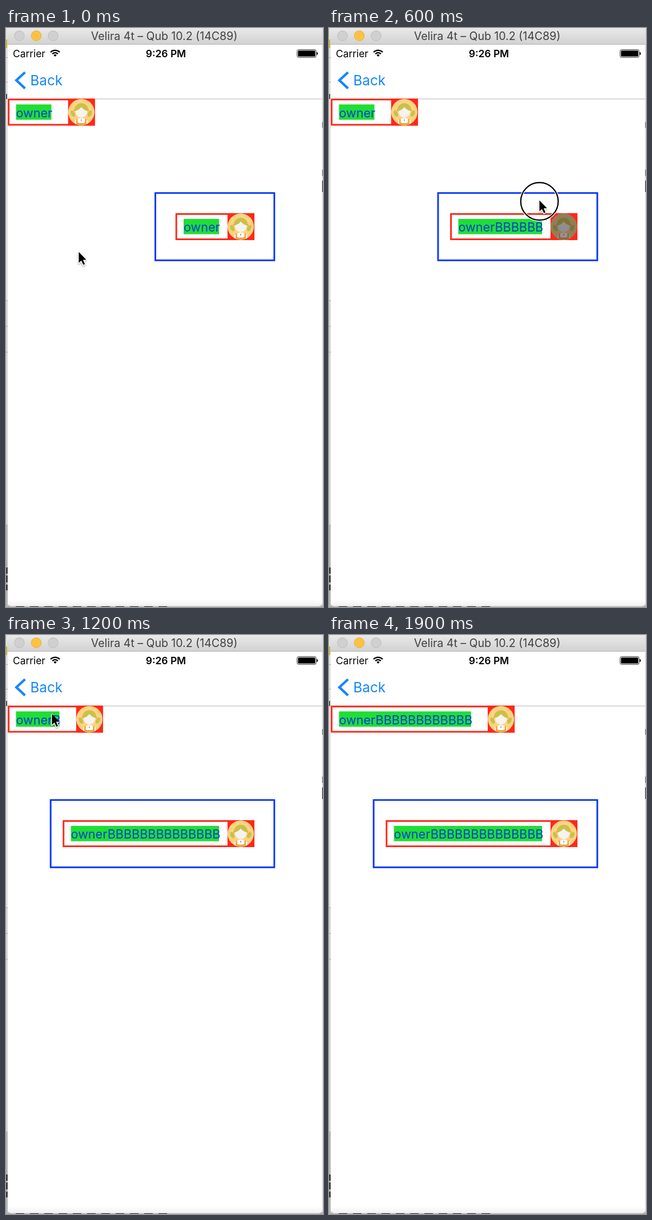
An HTML page with a canvas that plays this animation: 555 by 1010 pixels, repeating every 2000 ms.

```html
<!DOCTYPE html>
<html lang="en">
<head>
<meta charset="utf-8">
<title>Growing labels</title>
<style>
  html, body { margin: 0; width: 100%; height: 100%; overflow: hidden; background: #fff; }
  canvas { display: block; width: 555px; height: 1010px; }
</style>
</head>
<body>
<canvas id="stage" width="555" height="1010"></canvas>
<script>
const ctx = document.getElementById('stage').getContext('2d');
const LOOP = 2000, STEP = 100;
const RED = '#ff2819', GREEN = '#1fdf34', BLUE = '#0636fb', SKY = '#1586fa';
const NAME = 'owner', NAME_W = 62, LETTER_W = 14.1;

// Letters appended to each label, one entry per step
const rightCount = [0, 0, 0, 0, 2, 4, 6, 9, 11, 13, 14];
const leftCount = [0, 0, 0, 0, 0, 0, 0, 0, 0, 0, 0, 0, 1, 3, 5, 7, 9, 10, 11, 12];

// Pointer stops: step, x, y
const stops = [[0, 127, 390], [3, 368, 300], [10, 368, 300], [12, 80, 137], [18, 80, 137]];
const PRESS_STEP = 6;

function rect(x, y, w, h, fill) {
  ctx.fillStyle = fill;
  ctx.fillRect(x, y, w, h);
}

function frame(x, y, w, h, color, line = 2.9) {
  ctx.strokeStyle = color;
  ctx.lineWidth = line;
  ctx.strokeRect(x + line / 2, y + line / 2, w - line, h - line);
}

function disc(x, y, r, fill, stroke) {
  ctx.beginPath();
  ctx.arc(x, y, r, 0, Math.PI * 2);
  if (fill) { ctx.fillStyle = fill; ctx.fill(); }
  if (stroke) { ctx.strokeStyle = stroke; ctx.lineWidth = 1; ctx.stroke(); }
}

function oval(x, y, rx, ry, turn, fill) {
  ctx.beginPath();
  ctx.ellipse(x, y, rx, ry, turn, 0, Math.PI * 2);
  ctx.fillStyle = fill;
  ctx.fill();
}

function roundBox(x, y, w, h, r, fill) {
  ctx.beginPath();
  ctx.roundRect(x, y, w, h, r);
  ctx.fillStyle = fill;
  ctx.fill();
}

function text(str, x, y, size, fill, align = 'left', weight = 400) {
  ctx.font = `${weight} ${size}px Inter, "Liberation Sans", sans-serif`;
  ctx.textAlign = align;
  ctx.fillStyle = fill;
  ctx.fillText(str, x, y);
}

function poly(points) {
  ctx.beginPath();
  points.forEach(([x, y], i) => i ? ctx.lineTo(x, y) : ctx.moveTo(x, y));
}

function drawBackdrop() {
  rect(0, 0, 555, 1010, '#d6d6d6');
  rect(0, 0, 3, 475, '#e2e2e2');
  rect(0, 866, 3, 144, '#b6b6b6');
  rect(0, 20, 2, 15, '#c9b830');
  rect(0, 115, 2, 9, '#555');
  for (const y of [51, 94, 475, 520, 565]) rect(0, y, 3, 1, '#a0a0a0');
  for (const [y, h] of [[941, 11], [955, 12], [971, 10]]) rect(0, y, 3, h, '#444');
  rect(553, 164, 2, 10, '#777');
  rect(553, 247, 2, 11, '#777');
  rect(553, 266, 2, 20, '#444');
  rect(0, 1007, 555, 3, '#b4b4b4');
  for (let x = 17; x < 275; x += 25) rect(x, 1008.5, 15, 1.5, '#333');
}

function drawWindow() {
  roundBox(3, 0, 550.5, 1008.5, [0, 0, 6, 6], '#fff');
  const foot = ctx.createLinearGradient(0, 996, 0, 1008);
  foot.addColorStop(0, '#fff');
  foot.addColorStop(1, '#f1f1f1');
  roundBox(3, 996, 550.5, 12, [0, 0, 6, 6], foot);

  const bar = ctx.createLinearGradient(0, 0, 0, 28);
  bar.addColorStop(0, '#e9e9e9');
  bar.addColorStop(1, '#d2d2d2');
  rect(2, 0, 552, 28, bar);
  rect(2, 28, 552, 1, '#b3b3b3');
  disc(23.5, 13.5, 8.7, '#d0d0d0', '#bcbcbc');
  disc(53, 13.5, 8.7, '#fdc241', '#e6ae3c');
  disc(82.5, 13.5, 8.7, '#d0d0d0', '#bcbcbc');
  text('Velira 4t – Qub 10.2 (14C89)', 277, 20.5, 19.5, '#404040', 'center');
}

function drawWifi(x, y) {
  ctx.strokeStyle = '#000';
  ctx.lineWidth = 2.3;
  for (const r of [6.8, 11.2]) {
    ctx.beginPath();
    ctx.arc(x, y, r, -Math.PI * 0.75, -Math.PI * 0.25);
    ctx.stroke();
  }
  ctx.beginPath();
  ctx.moveTo(x, y);
  ctx.arc(x, y, 3.8, -Math.PI * 0.75, -Math.PI * 0.25);
  ctx.fillStyle = '#000';
  ctx.fill();
}

function drawBars() {
  text('Carrier', 12, 50.5, 17.4, '#000');
  drawWifi(86, 50);
  text('9:26 PM', 280, 50.5, 17.4, '#000', 'center', 600);

  ctx.beginPath();
  ctx.roundRect(509.6, 37.6, 33.4, 13.8, 3);
  ctx.strokeStyle = '#000';
  ctx.lineWidth = 0.8;
  ctx.stroke();
  roundBox(511.2, 39.2, 30.2, 10.6, 1.5, '#000');
  roundBox(544, 42, 1.8, 5, [0, 2, 2, 0], '#000');

  poly([[33.3, 77.2], [18.2, 91.3], [33.3, 105.4]]);
  ctx.strokeStyle = SKY;
  ctx.lineWidth = 4.3;
  ctx.stroke();
  text('Back', 42.5, 99.8, 24.2, SKY);
  rect(3, 123.3, 550.5, 1, '#b4b4b4');
}

function drawAvatar(x, y, pressed) {
  rect(x, y, 47, 47, RED);
  ctx.save();
  ctx.translate(x + 23.2, y + 23.5);
  ctx.beginPath();
  ctx.arc(0, 0, 23, 0, Math.PI * 2);
  ctx.clip();
  rect(-24, -24, 48, 48, '#fed381');
  const hair = '#c9c14a', skin = '#f8f2f0', dress = '#efa53a';
  for (const side of [-1, 1]) {
    oval(side * 14.8, 2.5, 3.4, 6, side * 0.5, hair);
    disc(side * 12, -3, 1.4, '#e8a13c');
  }
  roundBox(-11, 12, 22, 14, 5, '#fffaf4');
  rect(-9, 18, 18, 8, dress);
  rect(-9, 12, 2.6, 7, dress);
  rect(6.4, 12, 2.6, 7, dress);
  rect(-2.5, 7, 5, 6, '#f3dfd4');
  oval(0, -0.5, 10.2, 10, 0, skin);

  // Parted fringe
  ctx.beginPath();
  ctx.moveTo(-12.5, -2);
  ctx.quadraticCurveTo(-4, -3, 0, -9);
  ctx.quadraticCurveTo(4, -3, 12.5, -2);
  ctx.bezierCurveTo(12, -11, 7, -15.5, 0, -15.5);
  ctx.bezierCurveTo(-7, -15.5, -12, -11, -12.5, -2);
  ctx.fillStyle = hair;
  ctx.fill();
  roundBox(-5.5, 11, 11, 8, 1, '#fff');
  rect(-0.8, 12.5, 1.6, 3, '#9a9a90');
  if (pressed) rect(-24, -24, 48, 48, 'rgba(45,40,45,0.5)');
  ctx.restore();
}

function drawLabel(x, y, count, gap, pressed) {
  const w = NAME_W + LETTER_W * count;
  const avatarX = x + 14.3 + w + gap;
  rect(x + 14.3, y + 10, w, 26.7, GREEN);
  text(NAME + 'B'.repeat(count), x + 14.3, y + 32.3, 21.6, '#0a3cdc');
  frame(x, y, avatarX + 46.8 - x, 47, RED);
  drawAvatar(avatarX, y, pressed);
}

function drawRight(count, pressed) {
  const x = 296.7 - LETTER_W * count;
  const edge = Math.min(260, x - 22.6);
  frame(edge, 286.4, 471.2 - edge, 120.3, BLUE);
  drawLabel(x, 323, count, 14.8, pressed);
}

function drawPointer(x, y, pressed) {
  if (pressed) {
    ctx.beginPath();
    ctx.arc(x + 0.5, y + 2.4, 32.8, 0, Math.PI * 2);
    ctx.strokeStyle = '#fff';
    ctx.lineWidth = 4.5;
    ctx.stroke();
    ctx.strokeStyle = '#000';
    ctx.lineWidth = 2.2;
    ctx.stroke();
  }
  ctx.save();
  ctx.translate(x + 0.4, y + 0.8);
  poly([[0, 0], [0, 19], [4.4, 15], [7.9, 22.3], [10.7, 20.9], [7.4, 13.8], [13.2, 13.4]]);
  ctx.shadowColor = 'rgba(0,0,0,0.35)';
  ctx.shadowBlur = 3;
  ctx.shadowOffsetY = 1.5;
  ctx.lineJoin = 'round';
  ctx.strokeStyle = '#fff';
  ctx.lineWidth = 3;
  ctx.stroke();
  ctx.shadowColor = 'transparent';
  ctx.fillStyle = '#000';
  ctx.fill();
  ctx.restore();
}

function pointerAt(step) {
  const i = stops.findIndex(s => s[0] >= step);
  if (i < 0) return null;
  const [t1, x1, y1] = stops[i];
  const [t0, x0, y0] = stops[Math.max(0, i - 1)];
  const p = t1 > t0 ? (step - t0) / (t1 - t0) : 1;
  const k = p * p * (3 - 2 * p);
  return [x0 + (x1 - x0) * k, y0 + (y1 - y0) * k];
}

function draw(ms) {
  const step = Math.floor((ms % LOOP) / STEP);
  const pressed = step === PRESS_STEP;
  drawBackdrop();
  drawWindow();
  drawBars();
  drawLabel(3.2, 123.3, leftCount[step], 29.2, false);
  drawRight(rightCount[Math.min(step, rightCount.length - 1)], pressed);
  const pos = pointerAt(step);
  if (pos) drawPointer(...pos, pressed);
}

let start;
function tick(now) {
  start ??= now;
  draw(now - start);
  requestAnimationFrame(tick);
}
draw(0);
requestAnimationFrame(tick);
</script>
</body>
</html>
```
